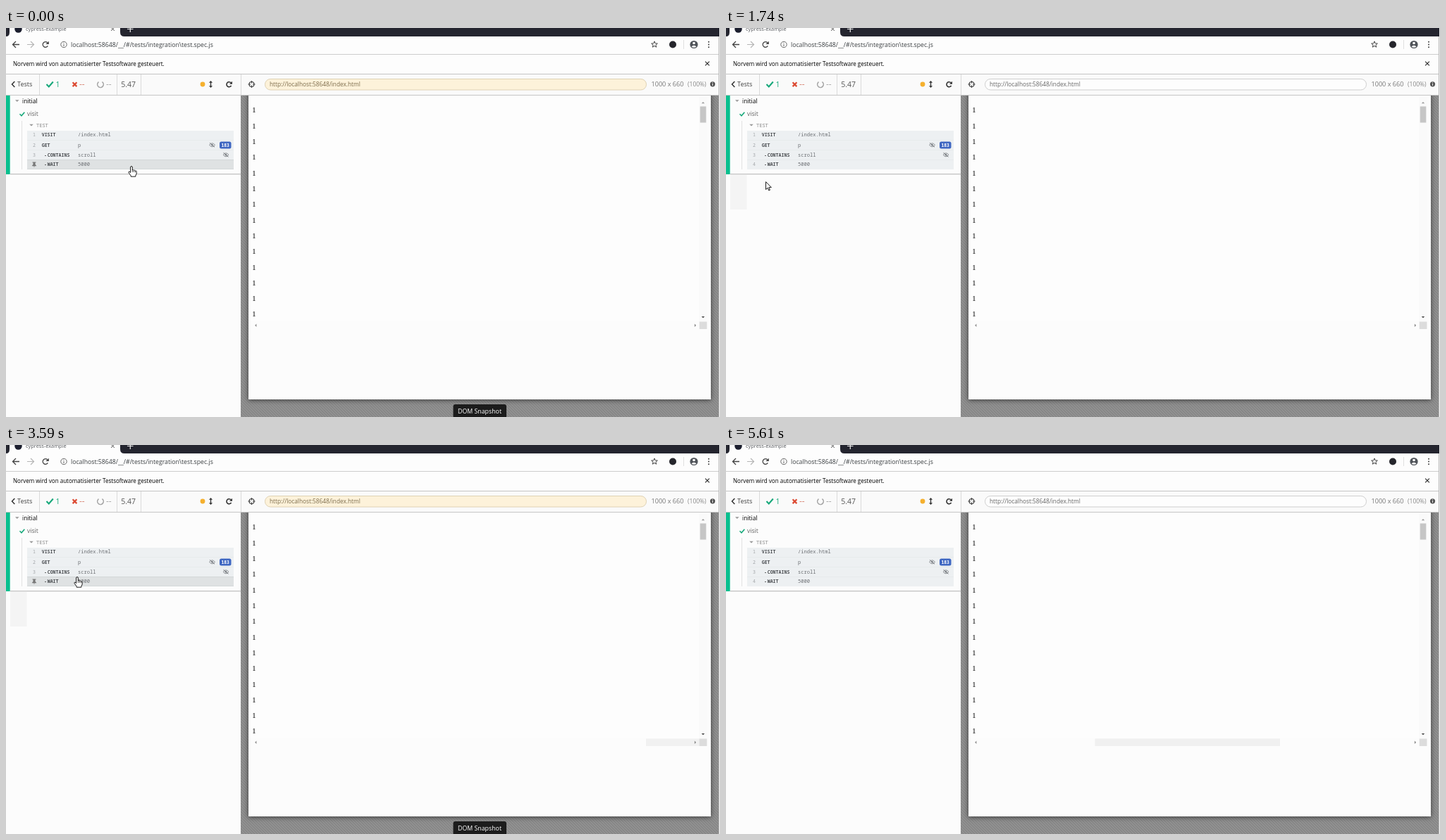
These frames come from a looping animation (1013x553 px, 5.92 s). An HTML page with a canvas:

```html
<!DOCTYPE html>
<html lang="de">
<head>
<meta charset="utf-8">
<title>Test runner</title>
<style>
html, body { margin: 0; width: 100%; height: 100%; overflow: hidden; background: #fff; }
canvas { display: block; width: 1013px; height: 553px; }
</style>
</head>
<body>
<canvas id="stage" width="1013" height="553"></canvas>
<script>
const ctx = document.getElementById('stage').getContext('2d', { alpha: false });
const LOOP = 5920;
const SANS = '"Open Sans", "Noto Sans", sans-serif';
const MONO = '"Noto Sans Mono", "DejaVu Sans Mono", monospace';
const SERIF = '"Liberation Serif", serif';
const GREEN = '#17a87a';

// Pointer legs: start, end, number of steps, target x, target y
const legs = [
  [0, 0, 1, 178, 197], [210, 210, 1, 178, 188], [540, 660, 3, 177, 181],
  [1280, 1280, 1, 107, 213], [1340, 1400, 2, 31, 240], [1590, 2070, 8, 99, 183],
  [2440, 2570, 3, 101, 190], [2810, 2860, 2, 100, 185], [2920, 2980, 2, 100, 182],
  [3410, 3590, 4, 101, 188], [3900, 4020, 3, 100, 181], [4580, 4580, 1, 100, 185],
  [4640, 4640, 1, 100, 187], [4820, 4882, 2, 180, 225], [4944, 5069, 3, 776, 430],
  [5131, 5131, 1, 848, 444], [5193, 5380, 4, 932, 521], [5430, 5550, 3, 948, 552],
  [5610, 5610, 1, 948, 600]
];
// Hovered command row over time, 0 for none
const hovers = [[0, 4], [600, 3], [1340, 0], [1933, 4], [2060, 3], [2505, 4],
  [2920, 3], [3470, 4], [3960, 3], [4882, 0]];

const hand = new Path2D('M-1.4 1Q-1.4-.4 0-.4T1.3 1V5Q2.5 4 3.4 5.4Q4.8 4.6 5.5 6Q7 5.5 7.2 7.3V10L5.8 13V14.2H-.8V13L-4 8.6Q-4.4 7-2.9 7.1L-1.4 8.6Z');
const arrow = new Path2D('M0 0V11L2.6 8.6L4.3 12.4L5.9 11.7L4.3 8H7.8Z');

function rect(x, y, w, h, color) {
  ctx.fillStyle = color;
  ctx.fillRect(x, y, w, h);
}
function pill(x, y, w, h, r, fill, border) {
  ctx.beginPath();
  ctx.roundRect(x, y, w, h, r);
  ctx.fillStyle = fill;
  ctx.fill();
  if (border) {
    ctx.strokeStyle = border;
    ctx.lineWidth = 1;
    ctx.stroke();
  }
}
function dot(x, y, r, color) {
  ctx.beginPath();
  ctx.arc(x, y, r, 0, 7);
  ctx.fillStyle = color;
  ctx.fill();
}
function line(d, color, width = 1) {
  ctx.strokeStyle = color;
  ctx.lineWidth = width;
  ctx.stroke(new Path2D(d));
}
function shape(d, color) {
  ctx.fillStyle = color;
  ctx.fill(new Path2D(d));
}
function arc(x, y, r, from, to, color, width) {
  ctx.beginPath();
  ctx.arc(x, y, r, from, to);
  ctx.strokeStyle = color;
  ctx.lineWidth = width;
  ctx.stroke();
}
function text(s, x, y, size, color, family = SANS, weight = 400, align = 'left') {
  ctx.font = `${weight} ${size}px ${family}`;
  ctx.textAlign = align;
  ctx.fillStyle = color;
  ctx.fillText(s, x, y);
}
function cross(x, y, r, color, width) {
  line(`M${x - r} ${y - r}L${x + r} ${y + r}M${x + r} ${y - r}L${x - r} ${y + r}`, color, width);
}
// Points along (dx, dy); the base is twice as wide as the vector is long, times two
function triangle(x, y, dx, dy, color) {
  const wx = 2 * dy, wy = 2 * dx;
  shape(`M${x + dx} ${y + dy}L${x - dx + wx} ${y - dy - wy}L${x - dx - wx} ${y - dy + wy}Z`, color);
}
function reload(x, y, r, color, width) {
  arc(x, y, r, 0.5, 5.5, color, width);
  shape(`M${x + r + 1} ${y - r - 1}v${r + .6}h${-r - .6}Z`, color);
}

function makeHatch() {
  const tile = document.createElement('canvas');
  tile.width = tile.height = 4;
  const c = tile.getContext('2d');
  c.fillStyle = '#909090';
  c.fillRect(0, 0, 4, 4);
  c.fillStyle = '#808080';
  for (let i = 0; i < 4; i++) c.fillRect(i, i, 1, 1);
  return ctx.createPattern(tile, 'repeat');
}
const hatch = makeHatch();

function drawBrowser() {
  rect(0, 0, 1013, 12, '#24252f');
  shape('M0 12Q5 12 5 6V0H162V6Q162 12 168 12Z', '#fdfdfd');
  dot(17.5, 1.5, 5.2, '#1b1e2e');
  text('cypress-example', 28, 4, 7.4, '#55585c');
  cross(151.5, 1.5, 2.3, '#444', 1);
  line('M172 1.5H180.500M176.300 -3V6', '#eee', 1.2);

  rect(0, 12, 1013, 25, '#fdfdfd');
  line('M19 23.500H10M14 19L9.500 23.500L14 28', '#444', 1.3);
  line('M30 23.500H39M35 19L39.500 23.500L35 28', '#b5b5b5', 1.2);
  reload(56, 23.5, 3.8, '#444', 1.3);
  arc(82, 23.5, 4.2, 0, 7, '#666', 1);
  rect(81.5, 23, 1, 3, '#666');
  rect(81.5, 21, 1, 1, '#666');
  text('localhost:58648/__/#/tests/integration\\test.spec.js', 92, 26.7, 8.72, '#3c4043');
  let star = '';
  for (let i = 0; i < 10; i++) {
    const r = i % 2 ? 2 : 4.6, a = i * Math.PI / 5;
    star += (i ? 'L' : 'M') + (920 + r * Math.sin(a)) + ' ' + (23.5 - r * Math.cos(a));
  }
  line(star + 'Z', '#444', 1);
  dot(946, 23.5, 5, '#25262c');
  rect(961, 17, 1, 13, '#e0e0e0');
  dot(976, 23.5, 5.6, '#50545a');
  dot(976, 21.5, 1.8, '#fff');
  shape('M972.500 26.500Q976 23 979.500 26.500Q976 29 972.500 26.500Z', '#fff');
  for (let i = -1; i < 2; i++) dot(997, 23.5 + i * 3.7, 1, '#444');

  rect(0, 37, 1013, 29, '#fdfdfd');
  rect(0, 37, 1013, 1, '#cdcdcd');
  rect(0, 65, 1013, 1, '#c4c4c4');
  text('Norvem wird von automatisierter Testsoftware gesteuert.', 10, 53.6, 8.05, '#000');
  cross(995, 50.5, 2.9, '#333', 1.2);
}

function drawHeader(active) {
  rect(0, 66, 1013, 30, '#fafafa');
  rect(0, 95, 1013, 1, '#c6c6c6');
  for (const x of [47, 157, 191, 333]) rect(x, 66, 1, 29, '#dadada');
  line('M12.300 76L8.500 80L12.300 84', '#333', 1.5);
  text('Tests', 16, 83.2, 9.1, '#444');
  line('M57.500 80L60.800 83.500L66.800 76.500', GREEN, 2.1);
  text('1', 70.5, 83.7, 10.5, GREEN);
  cross(97.5, 80.2, 2.9, '#dc4a33', 2.2);
  text('--', 104, 83.7, 12, '#d98676');
  arc(134, 80.2, 4.3, -1, 4.1, '#a5a5a5', 1.6);
  text('--', 142, 83.7, 12, '#aaa');
  text('5.47', 163.3, 83.7, 10.5, '#555');
  dot(279, 80, 3.4, '#f5b02e');
  line('M290.500 77V83', '#333', 1.4);
  triangle(290.5, 76.4, 0, -1.3, '#333');
  triangle(290.5, 83.6, 0, 1.3, '#333');
  reload(316.5, 80.2, 3.5, '#333', 1.6);
  arc(348.5, 80, 3.5, 0, 7, '#444', 1.2);
  line('M343.500 80H347M350 80H353.500M348.500 75V78.500M348.500 81.500V85', '#444', 1.2);

  pill(367.5, 72.5, 541, 15.5, 7.8, active ? '#fdf2da' : '#fdfdfd', active ? '#dfd2b4' : '#cfcfcf');
  text('http://localhost:58648/index.html', 374, 83, 8.27, active ? '#7c6c4b' : '#666');
  text('1000 x 660', 915.5, 83, 9.1, '#777');
  text('(100%)', 967, 83, 8.5, '#888');
  dot(1002.5, 79.8, 3.6, '#555');
  rect(1002, 79.3, 1, 2.5, '#fff');
  rect(1002, 77.4, 1, 1, '#fff');
}

function eye(x, y) {
  line(`M${x - 4} ${y}Q${x} ${y - 5} ${x + 4} ${y}Q${x} ${y + 5} ${x - 4} ${y}Z`, '#80858a', .9);
  dot(x, y, 1.3, '#80858a');
  line(`M${x - 3.5} ${y - 3}L${x + 3.5} ${y + 3}`, '#6c7074', .9);
}

function drawCommand(n, name, msg, child, hover) {
  const top = [146, 160, 174, 187][n - 1], mid = [152, 166.3, 180.3, 194][n - 1];
  if (hover === n) {
    rect(30, top, 293, 13.5, '#dfe2e3');
    rect(30, top, 293, .7, '#cfd3d5');
    rect(30, top + 13, 293, .7, '#cfd3d5');
    shape(`M37.500 ${mid - 3.5}h5v1h-1v2.500l1.500 1.500v.8h-2.500l-.5 2.500l-.5 -2.500h-2.500v-.8l1.500 -1.500v-2.500h-1Z`, '#777');
  } else {
    text(n, 38, mid + 2.3, 6.6, '#a3a6a9', MONO);
  }
  if (child) text('-', 54, mid + 2.3, 6.6, '#555', MONO, 700);
  text(name, child ? 58.7 : 50.7, mid + 2.3, 6.6, '#4b4e52', MONO, 700);
  text(msg, 102, mid + 2.4, 7.1, '#6c6f73', MONO);
}

function drawSidebar(t, hover) {
  rect(0, 96, 333, 457, '#fcfcfc');
  if (t >= 1280 && t < 1590) rect(103, 209, 80, 20, '#f7f7f7');
  if (t >= 1400 && t < 4882) rect(6, 209, 23.5, 49, '#f4f4f4');
  rect(0, 96, 5.7, 112, '#08bf8e');
  rect(5.7, 207, 327.3, 1, '#c4c4c4');
  rect(5.7, 208, 327.3, 1, '#e9e9e9');
  triangle(15.8, 103.7, 0, 1.4, '#999');
  text('initial', 23, 106.9, 8.5, '#000', SANS, 500);
  line('M19.500 122.300L22 124.800L26.300 119.800', GREEN, 1.6);
  text('visit', 30, 125.3, 8.6, '#666');
  rect(22, 132, 1, 69, '#e2e2e2');
  triangle(36, 138.2, 0, 1.4, '#999');
  text('TEST', 43, 141, 7.6, '#888');

  rect(30, 146, 293, 55, '#edf0f2');
  for (const y of [159.3, 173.3, 187]) rect(30, y, 293, .6, '#e4e7e9');
  drawCommand(1, 'VISIT', '/index.html', false, hover);
  drawCommand(2, 'GET', 'p', false, hover);
  drawCommand(3, 'CONTAINS', 'scroll', true, hover);
  drawCommand(4, 'WAIT', '5000', true, hover);
  eye(292.5, 166.3);
  eye(312, 180.3);
  pill(303, 161.5, 16.5, 10, 2.5, '#3f67c2');
  text('183', 311.2, 169, 6.4, '#fff', MONO, 700, 'center');
}

function drawPreview(t, hover) {
  rect(333, 96, 680, 457, hatch);
  ctx.save();
  ctx.shadowColor = 'rgba(0,0,0,.6)';
  ctx.shadowBlur = 7;
  ctx.shadowOffsetY = 1;
  rect(344, 90, 656, 438, '#fcfcfc');
  ctx.restore();
  const scrolled = hover === 3;

  ctx.save();
  ctx.beginPath();
  ctx.rect(344, 96, 651, 321);
  ctx.clip();
  rect(344, 96, 639.5, 321, '#fdfdfd');
  if (scrolled) {
    rect(344, 96, 639.5, 26.5, '#fbd9b8');
    rect(344, 101, 639.5, 11, '#b9d6f0');
    text('scroll', 349.3, 109.7, 10.5, '#6683a0', SERIF);
  }
  const first = scrolled ? 132 : 120.4;
  for (let i = 0; i < 14; i++) text('1', 349.2, first + i * 22.31, 10.5, '#000', SERIF);
  rect(983.5, 96, 11.5, 321, scrolled ? '#f5f5f5' : '#fafafa');
  rect(984.7, scrolled ? 231 : 111.5, 8.6, 23, '#c6c6c6');
  triangle(989, 106.2, 0, -1.1, scrolled ? '#444' : '#999');
  triangle(989, 411.2, 0, 1.1, '#444');
  ctx.restore();

  if (t >= 2060 && t < 5069) rect(908, 417.5, 76, 10.5, '#f1f1f1');
  if (t >= 5069) rect(523.5, 417.5, 262.5, 10.5, '#f0f0f0');
  rect(983.7, 417.5, 10.8, 10.5, '#dcdcdc');
  triangle(354.3, 422.7, -1.1, 0, '#888');
  triangle(978, 422.7, 1.1, 0, '#888');

  if (hover) {
    pill(634.5, 535, 75.5, 25, 3, '#1c1c1c');
    text('DOM Snapshot', 672, 548.3, 8.8, '#fff', SANS, 500, 'center');
  }
}

function drawEdge() {
  rect(1011, 12, 1, 541, '#b8b8b8');
  rect(1012, 0, 1, 553, '#f2f2f2');
}

function pointerAt(t) {
  let x = 0, y = 0;
  for (const [start, end, n, tx, ty] of legs) {
    if (t < start) break;
    const gap = n > 1 ? (end - start) / (n - 1) : 1;
    const p = Math.min(n, Math.floor((t - start) / gap + 1.001)) / n;
    x += (tx - x) * p;
    y += (ty - y) * p;
  }
  return [x, y];
}

function drawPointer(t, hover) {
  const [x, y] = pointerAt(t), path = hover ? hand : arrow;
  ctx.save();
  ctx.translate(x, y);
  ctx.fillStyle = '#fff';
  ctx.fill(path);
  ctx.strokeStyle = '#111';
  ctx.lineWidth = .95;
  ctx.lineJoin = 'round';
  ctx.stroke(path);
  if (hover) line('M1.300 5V8M3.400 5.500V8M5.500 6.200V8.300', '#111', .7);
  ctx.restore();
}

function draw(now) {
  const t = now % LOOP;
  const hover = hovers.filter(h => h[0] <= t).pop()[1];
  drawPreview(t, hover);
  drawSidebar(t, hover);
  drawHeader(hover > 0);
  drawBrowser();
  drawEdge();
  drawPointer(t, hover);
}

let begin;
function tick(now) {
  begin ??= now;
  draw(Math.max(0, now - begin));
  requestAnimationFrame(tick);
}
requestAnimationFrame(tick);
</script>
</body>
</html>
```
